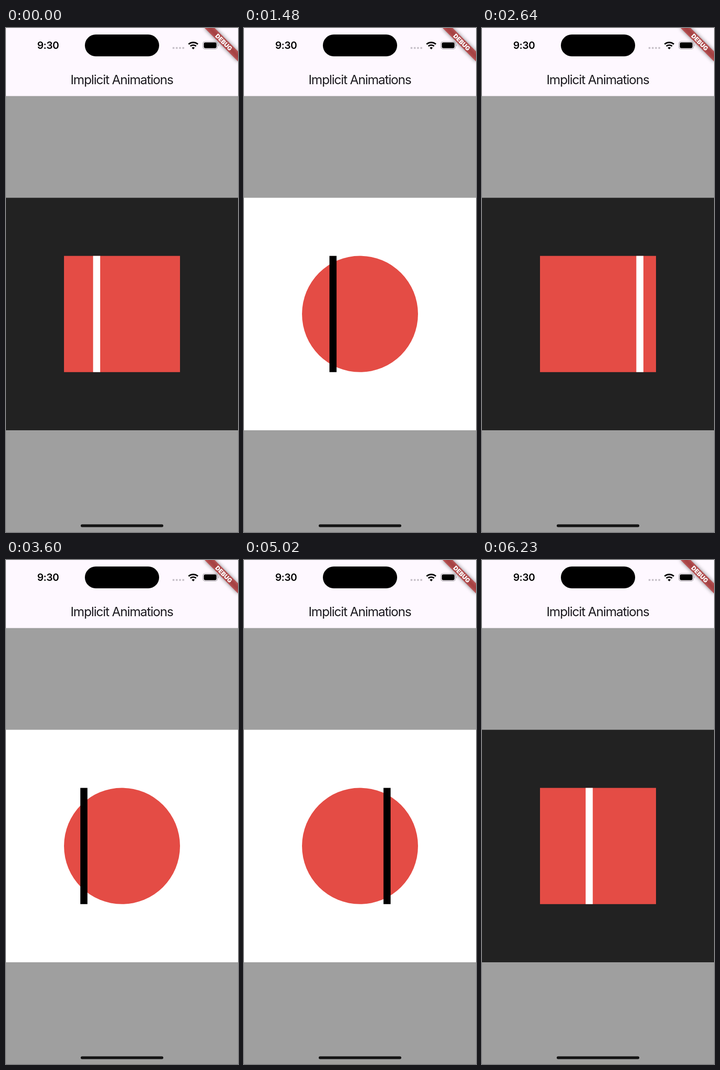
An HTML page for the animation above (6250 ms loop, 500 px wide and 1085 px high).

```html
<!DOCTYPE html>
<html lang="en">
<head>
<meta charset="utf-8">
<title>Implicit Animations</title>
<style>
  html, body { margin: 0; width: 100%; height: 100%; overflow: hidden; background: #9f9f9f; }
  svg { display: block; width: 100%; height: 100%; }
  text { font-family: Inter, Roboto, sans-serif; font-optical-sizing: none; text-anchor: middle; }
  .title { font-size: 27.5px; letter-spacing: -.046em; fill: #1d1b20; }
  .clock { font-size: 21.6px; font-weight: 600; letter-spacing: -.02em; }
  .debug { font-size: 13px; font-weight: 900; fill: #fff; }
</style>
</head>
<body>
<svg viewBox="0 0 500 1085">
  <defs>
    <filter id="blur" x="-50%" y="-200%" width="200%" height="500%">
      <feGaussianBlur stdDeviation="4.5"/>
    </filter>
  </defs>
  <rect width="500" height="1085" fill="#9f9f9f"/>
  <rect width="500" height="146.5" fill="#fef8ff"/>
  <text class="title" x="249.5" y="121">Implicit Animations</text>

  <!-- status bar -->
  <text class="clock" x="90.7" y="45">9:30</text>
  <rect x="170" y="14" width="160" height="47" rx="23.5"/>
  <path d="M359 43h25" stroke="#cbc5cd" stroke-width="4" stroke-dasharray="4 3"/>
  <g fill="none" stroke="#000" stroke-width="3.2">
    <path d="M393.5 34.9a14.9 14.9 0 0 1 20 0M397.3 39.1a9.3 9.3 0 0 1 12.4 0"/>
    <path d="M403.5 46l-3.3-3.5a4.8 4.8 0 0 1 6.6 0z" fill="#000" stroke="none"/>
  </g>
  <rect x="424.3" y="29" width="31.4" height="16.4" rx="5" fill="none" stroke="#aaa5ac" stroke-width="1.2"/>
  <rect x="426.3" y="31" width="27.4" height="12.4" rx="3.4"/>
  <path d="M457 34.7q2.4 2.5 0 5z" fill="#aaa5ac"/>

  <!-- corner ribbon -->
  <g transform="translate(500 0) rotate(45)">
    <rect x="-51" y="35.6" width="102" height="15.3" fill-opacity=".5" filter="url(#blur)"/>
    <rect x="-51" y="35.6" width="102" height="15.3" fill="#b71c1c" fill-opacity=".627"/>
    <text class="debug" y="48">DEBUG</text>
  </g>

  <rect id="panel" y="365.5" width="500" height="500.5"/>
  <rect id="shape" x="125" y="490.6" width="250" height="250.2" fill="#e44c45"/>
  <rect id="bar" y="490.6" width="15.3" height="250.2"/>
  <rect x="161" y="1068.5" width="178" height="6" rx="3" fill="#141414"/>
</svg>
<script>
  const LOOP = 6250, SWEEP = 1000, LEFT = 125, TRAVEL = 234.8;
  // Start of each sweep in ms; rightward and leftward sweeps alternate.
  const sweeps = [-266, 733, 1757, 2751, 3763, 4769, 5812];
  const [panel, shape, bar] = ['panel', 'shape', 'bar'].map(id => document.getElementById(id));

  function draw(now) {
    const t = now % LOOP;
    const index = sweeps.findLastIndex(start => start <= t);
    const rightward = index % 2 === 0;
    const progress = Math.min(1, (t - sweeps[index]) / SWEEP);
    bar.setAttribute('x', LEFT + TRAVEL * (rightward ? progress : 1 - progress));
    bar.setAttribute('fill', rightward ? '#fff' : '#000');
    panel.setAttribute('fill', rightward ? '#222' : '#fff');
    shape.setAttribute('rx', rightward ? 0 : 125);
    requestAnimationFrame(draw);
  }
  draw(0);
</script>
</body>
</html>
```
